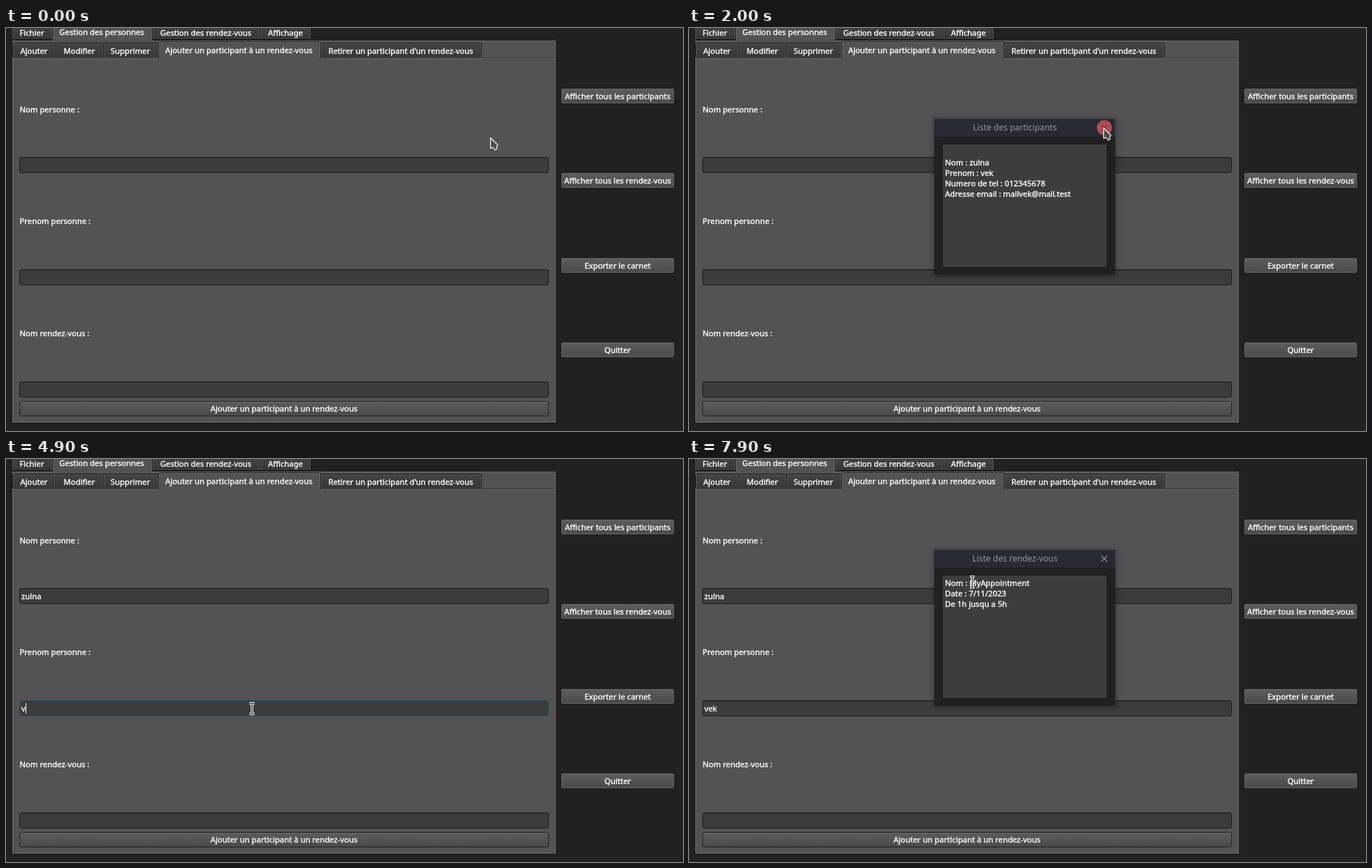
Recreate the animation shown at these times as an HTML page. Size 969 by 578 pixels, loop 8 s.

```html
<!DOCTYPE html>
<html lang="fr">
<head>
<meta charset="utf-8">
<style>
html, body { margin: 0; width: 100%; height: 100%; overflow: hidden; background: #222021; }
svg { display: block; width: 969px; height: 578px; }
text { font: 11.3px "Noto Sans", "Open Sans", sans-serif; fill: #fff; stroke: #fff; stroke-width: .36px; white-space: pre; }
text.title { font-size: 12.07px; fill: #97979a; stroke: none; }
.shadow { filter: drop-shadow(0 1px 4px rgba(0, 0, 0, .45)); }
</style>
</head>
<body>
<svg viewBox="0 0 969 578">
  <defs>
    <linearGradient id="button" x2="0" y2="1"><stop stop-color="#5d5c5f"/><stop offset="1" stop-color="#4a494b"/></linearGradient>
    <linearGradient id="hover" x2="0" y2="1"><stop stop-color="#636265"/><stop offset="1" stop-color="#4f4e50"/></linearGradient>
    <linearGradient id="tab" x2="0" y2="1"><stop stop-color="#444346"/><stop offset="1" stop-color="#373638"/></linearGradient>
  </defs>
  <g id="window"></g>
  <g id="live"></g>
</svg>
<script>
const LOOP = 8000, STEP = 100;
const LAST = 'zulna', FIRST = 'vek';
const $ = id => document.getElementById(id);

const rect = (x, y, w, h, fill, stroke = 'none', r = 0) =>
  `<rect x="${x}" y="${y}" width="${w}" height="${h}" rx="${r}" fill="${fill}" stroke="${stroke}"/>`;
const label = (x, y, s, anchor = 'start', extra = '') =>
  `<text x="${x}" y="${Math.round(y + 4)}" text-anchor="${anchor}" ${extra}>${s}</text>`;
const line = (d, color) => `<path d="${d}" fill="none" stroke="${color}"/>`;

const sideButtons = [
  [87, 'Afficher tous les participants'], [208, 'Afficher tous les rendez-vous'],
  [330, 'Exporter le carnet'], [451, 'Quitter']
];
const fields = [[185, 117, 'Nom personne :'], [346, 277, 'Prenom personne :'], [507, 438, 'Nom rendez-vous :']];

// a tab standing on the line y; the selected one is taller and open below
function tab(x, end, y, s, cx, selected) {
  const top = y - (selected ? 24 : 22), bottom = selected ? y + 2 : y;
  return rect(x + .5, top + .5, end - x, bottom - top - 1, selected ? '#535355' : 'url(#tab)', '#1d1b1c', 2) +
    line(`M${x + 1.5} ${bottom - 1}V${top + 1.5}H${end - .5}V${bottom - 1}`, selected ? '#68686a' : '#535254') +
    (selected ? rect(x + 1, y - 1, end - x - 1, 4, '#535355') : '') +
    label(cx, selected ? y - 11 : y - 10, s, 'middle');
}

function sideButton([y, s], hovered) {
  return rect(795.5, y + .5, 160, 20, `url(#${hovered ? 'hover' : 'button'})`, '#69686b', 1) +
    label(875.5, y + 10.5, s, 'middle');
}

function drawWindow() {
  return rect(8.5, 17.5, 779, 549, '#535355', '#1b191a') +
    line('M9.5 566V18.5H786.5V565.5H9.5', '#6d6d6f') +
    tab(8, 66, 17, 'Fichier', 37) +
    tab(209, 363, 17, 'Gestion des rendez-vous', 286) +
    tab(363, 436, 17, 'Affichage', 400) +
    tab(66, 209, 17, 'Gestion des personnes', 137, true) +
    tab(9, 71, 43, 'Ajouter', 40) +
    tab(71, 139, 43, 'Modifier', 105) +
    tab(139, 218, 43, 'Supprimer', 178) +
    tab(450, 680, 43, "Retirer un participant d'un rendez-vous", 565) +
    line('M10 42.5H786', '#363537') + line('M10 43.5H786', '#656567') +
    tab(218, 450, 43, 'Ajouter un participant à un rendez-vous', 333.3, true) +
    fields.map(([, y, s]) => label(19.5, y, s)).join('') +
    rect(19.5, 535.5, 757, 21, 'url(#button)', '#222021', 2) +
    line('M21 536.5H775', '#69686b') +
    label(398, 546, 'Ajouter un participant à un rendez-vous', 'middle');
}

function field(i, s, focused) {
  const y = fields[i][0];
  return rect(19.5, y + .5, 757, 22, '#3c3c3c', focused ? '#23506c' : '#1d1b1c', 2) +
    line(`M21 ${y + 1.5}H775`, focused ? '#2f414b' : '#343435') +
    label(22, y + 11.5, s, 'start', `id="field${i}"`);
}

function dialog(title, lines, top, closing) {
  return `<g class="shadow">${rect(351, 130, 259, 224, '#222021')}</g>` +
    rect(351, 130, 259, 26, '#272a33') +
    line('M351 130.5H610', '#30333c') +
    label(466.5, 143, title, 'middle', 'class="title"') +
    (closing ? '<circle cx="594.5" cy="143" r="10.7" fill="#b64c54"/>' : '') +
    line('M590.2 138.7l8.6 8.6m0-8.6l-8.6 8.6', closing ? '#2b2a32' : '#d2d3d7') +
    rect(362.5, 166.5, 236, 177, '#3d3d3d', '#1b191a') +
    lines.map((s, i) => label(366.5, top + i * 15, s)).join('');
}

const pointer = (x, y, beam) => `<g transform="translate(${x} ${y})">` + (beam
  ? '<path d="M-3.5-7.5H3.5M0-7V7M-3.5 7.5H3.5" stroke="#fff" stroke-width="3.4"/>' +
    '<path d="M-3.5-7.5H3.5M0-7V7M-3.5 7.5H3.5" stroke="#222" stroke-width="1.2"/>'
  : '<path d="M.5.5V15.5L4 14L7 18L9.5 16.5V13L11 11Z" fill="#4c4b4d" stroke="#fff" stroke-width="1.1" stroke-linejoin="round"/>') + '</g>';

// time, x, y
const path = [
  [0, 693, 157], [300, 770, 130], [600, 844, 106], [700, 844, 106], [800, 828, 106], [900, 771, 106],
  [1100, 650, 122], [1400, 462, 140], [1500, 480, 142], [1800, 593, 143], [2000, 593, 143],
  [2100, 575, 152], [2300, 390, 196], [2400, 354, 201], [3700, 354, 201], [3900, 370, 150],
  [4300, 362, 383], [4400, 352, 358], [5700, 352, 358], [6000, 720, 326], [6200, 864, 293.5],
  [6600, 880, 228], [6700, 880, 228], [7100, 610, 192], [7500, 413, 174], [7900, 405.5, 176.5]
];

function pointerAt(t) {
  const i = path.findIndex(p => p[0] >= t);
  if (i < 1) return path[0].slice(1);
  const [a, b] = [path[i - 1], path[i]], k = (t - a[0]) / (b[0] - a[0]);
  return [1, 2].map(n => a[n] + (b[n] - a[n]) * k);
}

// typed length: number of key times already passed
const typed = (s, times, t) => s.slice(0, times.filter(at => t >= at).length);
const within = (t, a, b) => t >= a && t < b;

function render(t) {
  const [x, y] = pointerAt(t);
  const people = within(t, 700, 2100), meetings = t >= 6700, open = people || meetings;
  const focus = within(t, 2400, 4400) ? 0 : within(t, 4400, 6700) ? 1 : -1;
  const caret = within(t, 2400, 2900) || within(t, 3000, 4100) || within(t, 4400, 5800);
  const texts = [typed(LAST, [3000, 3200, 3200, 3400, 3600], t), typed(FIRST, [4900, 5100, 5200], t), ''];
  const onButton = top => !open && x >= 795 && x <= 956 && y >= top && y <= top + 21;
  const beam = open
    ? x > 362 && x < 598 && y > 166 && y < 343
    : x < 777 && fields.some(([top]) => y >= top && y <= top + 23);

  $('live').innerHTML =
    sideButtons.map(b => sideButton(b, onButton(b[0]))).join('') +
    texts.map((s, i) => field(i, s, i === focus)).join('') +
    '<g id="caret"></g>' +
    (people ? dialog('Liste des participants', [
      'Nom : ' + LAST, 'Prenom : ' + FIRST, 'Numero de tel : 012345678', 'Adresse email : mailvek@mail.test'
    ], 193, t >= 1800) : '') +
    (meetings ? dialog('Liste des rendez-vous', ['Nom : MyAppointment', 'Date : 7/11/2023', 'De 1h jusqu a 5h'], 178) : '') +
    pointer(x, y, beam);

  if (caret) {
    const cx = Math.round(22 + $('field' + focus).getComputedTextLength()) + .5;
    $('caret').innerHTML = line(`M${cx} ${fields[focus][0] + 4}v15`, '#fff');
  }
}

let shown = -1;
function tick() {
  const t = Math.floor(performance.now() % LOOP / STEP) * STEP;
  if (t !== shown) render(shown = t);
  requestAnimationFrame(tick);
}
$('window').innerHTML = drawWindow();
tick();
</script>
</body>
</html>
```
